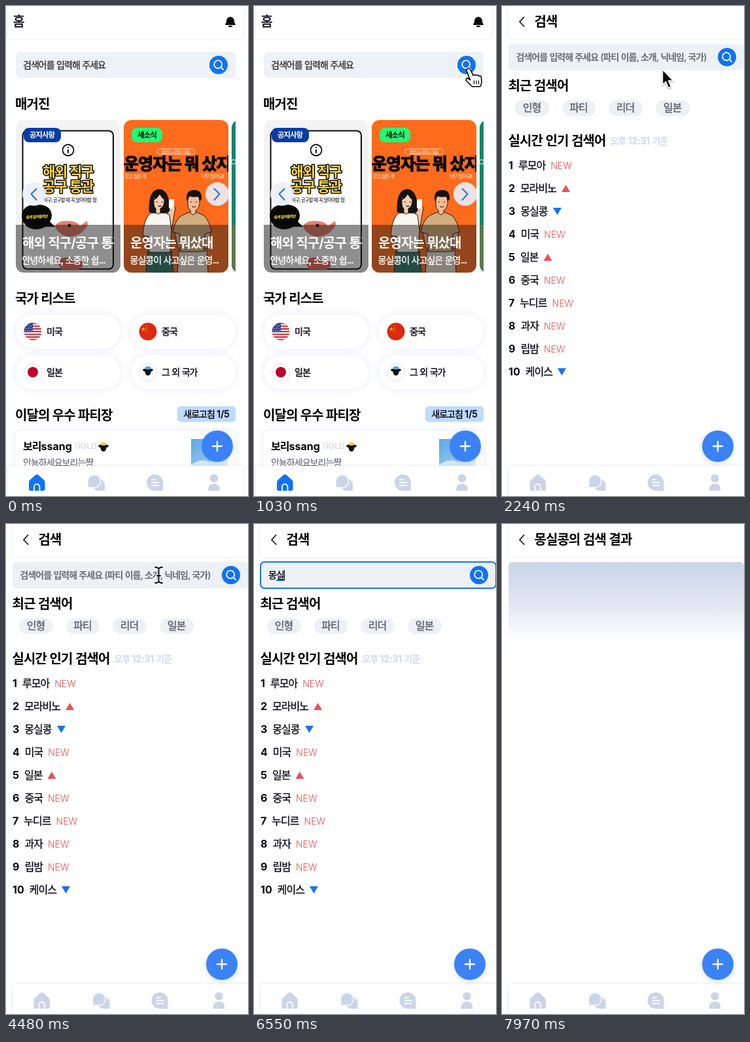
Recreate the animation shown at these times as an HTML page. Size 370x748 px, loop 8 s.

```html
<!DOCTYPE html>
<html lang="ko">
<head>
<meta charset="utf-8">
<title>홈</title>
<style>
  html, body { margin: 0; width: 100%; height: 100%; overflow: hidden; background: #fff; }
  body, svg { font-family: Inter, "Noto Sans CJK KR", "Noto Sans CJK", sans-serif; letter-spacing: -.06em; word-spacing: .04em; }
  #stage { position: relative; width: 370px; height: 748px; overflow: hidden; color: #050510; }
  svg, .page { position: absolute; inset: 0; width: 370px; height: 748px; }

  .h { font-size: 20px; font-weight: 700; }
  .m { font-size: 20px; font-weight: 600; }
  .t { font-size: 14px; }
  .chip { font-size: 16px; text-anchor: middle; }
  .medium, .t, .chip { font-weight: 500; fill: currentColor; stroke: currentColor; stroke-width: .35px; }
  .badge { font-size: 11.5px; font-weight: 700; text-anchor: middle; }
  .latin { letter-spacing: 0; }
  .white { fill: #fff; color: #fff; }
  .bar { fill: #fff; filter: drop-shadow(0 0 2px #9095b544); }
  .soft { fill: #fff; filter: drop-shadow(0 0 6px #b9c4f055); }
  .fab { fill: #3b82f6; filter: drop-shadow(0 2px 5px #6080d044); }
  .line { fill: none; stroke-linecap: round; stroke-linejoin: round; }

  ol { position: absolute; left: 10px; top: 226px; margin: 0; padding: 0; list-style: none; }
  li { display: flex; gap: 8px; height: 35px; font-size: 16px; line-height: 35px; -webkit-text-stroke: .25px; }
  li b, li i { letter-spacing: 0; -webkit-text-stroke: 0; }
  li i { font-style: normal; font-size: 14px; font-weight: 300; color: #ea4d52; }
  li .up, li .down { width: 13px; height: 11px; margin-top: 12px; background: #ea5156; clip-path: polygon(50% 0, 100% 100%, 0 100%); }
  li .down { background: #1673ef; transform: scaleY(-1); }

  #typed { position: absolute; left: 22px; top: 68px; display: flex; align-items: center; height: 20px; font-size: 14px; line-height: 20px; -webkit-text-stroke: .35px; }
  #typed span::before { content: ""; }
  #live { text-decoration: underline 2px #1673ef; text-underline-offset: 2px; }
  #caret { width: 1px; height: 16px; background: #000; }

  /* Everything shares one 8 s clock */
  #home, #search, #result, #focus, #hint, #caret, #ibeam, #hand, #arrow,
  #done::before, #live::before { animation: 8s step-end infinite; }
  #home { animation-name: home; }
  #search { animation-name: search; }
  #result { animation-name: result; }
  #focus { animation-name: focus; }
  #hint { animation-name: hint; }
  #caret { animation-name: caret; }
  #done::before { animation-name: done; }
  #live::before { animation-name: live; }
  #hand { animation-name: hand; }
  #arrow { animation-name: arrow; }
  #ibeam { animation-name: ibeam; }
  #handPath { animation: handPath 8s linear infinite; }
  #arrowPath { animation: arrowPath 8s ease-out infinite; }

  @keyframes home { 0% { opacity: 1 } 28% { opacity: 0 } }
  @keyframes search { 0% { opacity: 0 } 28% { opacity: 1 } 91.625% { opacity: 0 } }
  @keyframes result { 0% { opacity: 0 } 91.625% { opacity: 1 } }
  @keyframes focus { 0% { opacity: 0 } 58.75% { opacity: 1 } }
  @keyframes hint { 0% { opacity: 1 } 68.5% { opacity: 0 } }
  @keyframes caret { 0% { opacity: 0 } 58.75% { opacity: 1 } 65.125% { opacity: 0 } 68.5% { opacity: 1 } }
  @keyframes done { 0% { content: "" } 76.125% { content: "몽" } 82.25% { content: "몽실" } }
  @keyframes live {
    0% { content: "" } 68.5% { content: "ㅁ" } 70.5% { content: "모" } 74.625% { content: "몽" }
    76.125% { content: "ㅅ" } 77.625% { content: "시" } 79.875% { content: "실" }
    82.25% { content: "ㅋ" } 83.375% { content: "코" } 85.25% { content: "콩" }
  }
  @keyframes hand { 0% { opacity: 0 } 12.125% { opacity: 1 } 15.5% { opacity: 0 } }
  @keyframes handPath { 0%, 12.125% { transform: translate(24px, 40px) } 12.8%, 100% { transform: none } }
  @keyframes arrow { 0% { opacity: 0 } 28% { opacity: 1 } 29.5% { opacity: 0 } }
  @keyframes arrowPath { 0%, 28.1% { transform: none } 29.5%, 100% { transform: translate(-8px, -12px) } }
  @keyframes ibeam { 0% { opacity: 0 } 29.5% { opacity: 1 } 68.5% { opacity: 0 } }
</style>
</head>
<body>
<div id="stage">

<svg width="0" height="0">
  <defs>
    <linearGradient id="fade" x2="0" y2="1"><stop stop-color="#cad5e7"/><stop offset=".55" stop-color="#e3e8f4"/><stop offset="1" stop-color="#fff"/></linearGradient>
    <linearGradient id="sky" x2="1" y2="1"><stop stop-color="#5ba8e4"/><stop offset="1" stop-color="#c5e2f6"/></linearGradient>
    <clipPath id="card"><rect width="160" height="233" rx="12"/></clipPath>
    <clipPath id="cardText"><rect x="10" y="160" width="140" height="73"/></clipPath>
    <clipPath id="strip"><rect x="15" y="174" width="336" height="233"/></clipPath>
    <clipPath id="flag"><circle r="13.5"/></clipPath>

    <g id="lens">
      <circle r="14" fill="#0f73f6"/>
      <path class="line" d="M4 4l3 3M5.2-.8a6 6 0 1 1-12 0a6 6 0 1 1 12 0" stroke="#fff" stroke-width="1.8"/>
    </g>
    <g id="sheep">
      <path d="M-8-2q2-2 4-1q4-3 8 0q2-1 4 1q-1 3-3.500 3q-.5 6-4.500 6t-4.500-6q-2.500 0-3.500-3z" fill="#0b0b12"/>
      <ellipse cy="-4.500" rx="4.500" ry="2.500" fill="var(--cap)"/>
    </g>
    <g id="plus">
      <circle class="fab" r="24"/>
      <path class="line" d="M-7 0H7M0-7V7" stroke="#fff" stroke-width="2.4"/>
    </g>
    <g id="nav">
      <rect class="bar" x="3" y="702" width="360" height="60"/>
      <path d="M45.300 715.700q2-1.400 4 0l8.700 7.800q1.600 1.500 1.600 3.500v10q0 3-3 3H38q-3 0-3-3v-10q0-2 1.600-3.500z" fill="var(--home)"/>
      <path class="line" d="M43 741v-7a4.200 4.200 0 0 1 8.400 0v7" stroke="#fff" stroke-width="1.800"/>
      <g fill="#cbd5e8">
        <path d="M142 722a9.500 9.500 0 0 1 9 9v9h-9a9 9 0 0 1-8-5z"/>
        <path d="M125 735v-10a9.800 9.800 0 1 1 10 10z" stroke="#fff" stroke-width="1.500"/>
        <path d="M240 740h-12.500a12.500 12.500 0 1 1 12.500-12.500z"/>
        <circle cx="318" cy="721" r="6.200"/>
        <path d="M309 740q0-11 9-11t9 11z"/>
      </g>
      <path class="line" d="M223 723h5M223 727.500h10M223 732h10" stroke="#fff" stroke-width="2"/>
    </g>
    <g id="back">
      <rect class="bar" x="10" y="-10" width="370" height="60"/>
      <path class="line" d="M33.500 17l-6.500 7 6.500 7" stroke="#111" stroke-width="1.700"/>
    </g>
  </defs>
</svg>

<div class="page" id="home">
<svg style="--home:#0f73f6">
  <rect class="bar" x="3" y="-10" width="360" height="60"/>
  <text class="medium" x="10.500" y="31" font-size="20">홈</text>
  <path d="M335 28q2-2 2-5a6 6.500 0 0 1 12 0q0 3 2 5q0 1-1 1h-14q-1 0-1-1zM339.500 30h7q-1 2.500-3.500 2.500t-3.500-2.500z" fill="#060606"/>

  <rect x="15" y="70" width="336" height="40" rx="8" fill="#edf1f8"/>
  <text class="t" x="26" y="95" color="#333">검색어를 입력해 주세요</text>
  <use href="#lens" x="325" y="90"/>

  <text class="h" x="14" y="157">매거진</text>
  <g clip-path="url(#strip)">
    <g transform="translate(15 174)">
      <g clip-path="url(#card)">
        <rect width="160" height="233" fill="#f3f3f3"/>
        <rect x="10.500" y="16.500" width="138.500" height="211" rx="7" fill="#fff" stroke="#0a0a0a" stroke-width="2"/>
        <circle cx="80" cy="46" r="8.500" fill="none" stroke="#111" stroke-width="1.800"/>
        <path d="M80 45v5.500M80 41v1.800" stroke="#111" stroke-width="2.200"/>
        <g font-size="21" font-weight="900" text-anchor="middle" fill="#ffd447" stroke="#0a0a0a" stroke-width="3" stroke-linejoin="round" paint-order="stroke">
          <text x="80" y="86">해외 직구</text><text x="80" y="109">공구 통관</text>
        </g>
        <text x="42" y="125" font-size="7.500" font-weight="500">직구, 공구할 때 꼭 알아야할 점</text>
        <path d="M9 145q2-16 23-16q22 0 23 17q0 5-3 9l8 8-15 0q-6 4-15 4q-20-2-21-22z" fill="#080808"/>
        <text x="32" y="150" font-size="6" font-weight="700" text-anchor="middle" fill="#ffdc43" transform="rotate(-3 32 148)">쉽게 알려줄게양</text>
        <path d="M60 163q3-9 18-9q16 0 20 8l11-8q3 8-4 13q-5 9-22 11q-15 0-23-15z" fill="#ec806b"/>
        <path d="M62 216q12-10 26-4q8 4 16 0q2 12-8 16h-26z" fill="#e7705d"/>
        <circle cx="82" cy="161" r="2.500"/>
        <rect y="160" width="160" height="73" fill="#101010" opacity=".47"/>
      </g>
      <rect x="12" y="12" width="57" height="22" rx="8" fill="#073ca3"/>
      <text class="badge white" x="40" y="27">공지사항</text>
      <g class="white" clip-path="url(#cardText)">
        <text class="h" x="10" y="195">해외 직구/공구 통관</text>
        <text class="t" x="9.500" y="219">안녕하세요, 소중한 쉽...</text>
      </g>
    </g>

    <g transform="translate(180 174)">
      <g clip-path="url(#card)">
        <rect width="160" height="233" fill="#ff6b1c"/>
        <rect x="51" y="44" width="57" height="8" rx="4" fill="none" stroke="#fff" stroke-width=".8"/>
        <text class="white" x="79.500" y="50.500" font-size="5.500" text-anchor="middle">쉽게보는 운영자 기획템</text>
        <text y="76" font-size="25" font-weight="900" stroke="#050505" stroke-width="1.200">운영자는 뭐 샀지</text>
        <g class="white" font-size="7.500" font-weight="500"><text x="1" y="89">갖고 싶은 게</text><text x="119" y="89">너무 많아요!!</text></g>

        <g stroke="#201713" stroke-width="1" stroke-linejoin="round">
          <path d="M37 200h36l3 34H34z" fill="#26796a"/>
          <path d="M30 176l11 26 9-4-8-26zM62 158l9-27 8 3-6 34z" fill="#f5c5a3"/>
          <path d="M40 143l10-4h9l11 6 3 24-2 33H39l-1-24-9-2q2-25 11-33z" fill="#faf7f1"/>
          <path d="M39 140q-1-34 15-34q16 0 16 33l-6 3H44z" fill="#151313"/>
          <path d="M46 117q8-7 16 0v9q-2 8-6 9v6l-3 3-4-3v-6q-3-2-3-9z" fill="#f8cdb0"/>
          <path d="M84 199h43l2 35H82z" fill="#e8dfd0"/>
          <path d="M77 168l6 28 30-6-1-8-21 3-3-16zM133 168l-4 28-30-2v-8l22-1 2-18z" fill="#f0b992"/>
          <path d="M90 145l10-4h12l11 5q8 8 11 25l-10 3-1 27H86v-27l-11-3q4-20 15-26z" fill="#d3ad7c"/>
          <path d="M98 119q9-10 18 0v10q-3 8-6 9v4l-4 3-4-3v-4q-4-3-4-9z" fill="#f3bd98"/>
        </g>
        <path d="M46 122q6-2 9-9q3 7 8 9q1-13-8-13t-9 13zM96 122q-1-15 11-15q13-1 12 14l-3 3-2-7q-9 2-14-1l-2 8z" fill="#151313"/>
        <path d="M50 125h2M58 125h2M102 125h2M110 125h2M53 131q2 2 4 0M105 132q2 2 5 0" class="line" stroke="#3a211a" stroke-width="1.200"/>
        <rect x="69" y="121" width="8" height="14" rx="2" class="white"/>
        <rect y="160" width="160" height="73" fill="#221d19" opacity=".48"/>
      </g>
      <rect x="12" y="12" width="47" height="22" rx="8" fill="#20fa78"/>
      <text class="badge" x="35.500" y="27">새소식</text>
      <g class="white">
        <text class="h" x="10" y="195">운영자는 뭐샀대</text>
        <text class="t" x="9.500" y="219">몽실콩이 사고싶은 운영...</text>
      </g>
    </g>

    <g transform="translate(345 174)" clip-path="url(#card)">
      <rect width="160" height="233" fill="#16836d"/>
      <circle cx="3" cy="64" r="3.500" fill="none" stroke="#fff"/>
      <rect y="160" width="160" height="73" fill="#6f7840" opacity=".75"/>
    </g>
  </g>
  <g fill="#ebeff8" fill-opacity=".9"><circle cx="43" cy="287" r="18"/><circle cx="323" cy="287" r="18"/></g>
  <path class="line" d="M46.500 279l-8 8 8 9M318.500 279l8 8-8 9" stroke="#2870e8" stroke-width="2"/>

  <text class="h" x="14" y="454">국가 리스트</text>
  <g class="soft">
    <rect x="15" y="471" width="160" height="52" rx="26"/><rect x="191" y="471" width="160" height="52" rx="26"/>
    <rect x="15" y="533" width="160" height="52" rx="26"/><rect x="191" y="533" width="160" height="52" rx="26"/>
  </g>
  <g transform="translate(41 497)" clip-path="url(#flag)">
    <rect x="-14" y="-14" width="28" height="28" fill="#f6f2f2"/>
    <path d="M0-13.500v27" stroke="#c6303d" stroke-width="28" stroke-dasharray="2.080"/>
    <rect x="-14" y="-14" width="14" height="14.500" fill="#33458d"/>
    <path d="M-10-9h9M-11-5h10M-12-1h11" stroke="#fff" stroke-width="1.200" stroke-dasharray="1.200 2"/>
  </g>
  <circle cx="217" cy="497" r="13.500" fill="#df2810"/>
  <path d="M210 490.500l.8 2h2l-1.600 1.300.7 2-1.900-1.200-1.900 1.200.7-2-1.600-1.300h2z" fill="#ffdc20"/>
  <path d="M214.500 488v10" stroke="#ffdc20" stroke-width="1.200" stroke-dasharray="1.200 1.800"/>
  <g fill="#fff" stroke="#dfe1e7"><circle cx="41" cy="559" r="13.500"/><circle cx="217" cy="559" r="13.500"/></g>
  <circle cx="41" cy="559" r="8" fill="#bd0630"/>
  <use href="#sheep" x="217" y="557" style="--cap:#4aa3ed"/>
  <text class="t" x="62" y="501.500">미국</text><text class="t" x="238" y="501.500">중국</text>
  <text class="t" x="62" y="563.500">일본</text><text class="t" x="238" y="563.500">그 외 국가</text>

  <text class="h" x="14" y="632">이달의 우수 파티장</text>
  <rect x="262" y="611" width="89" height="24" rx="5" fill="#bfdbfe"/>
  <text class="t" x="306.500" y="628" text-anchor="middle">새로고침 <tspan class="latin">1/5</tspan></text>
  <rect class="soft" x="15" y="649" width="336" height="110" rx="4"/>
  <text x="26" y="678" font-size="16" font-weight="700">보리<tspan class="latin">ssang</tspan></text>
  <text class="latin" x="105" y="676" font-size="12" fill="#c8d1df">GOLD</text>
  <use href="#sheep" x="149" y="673" style="--cap:#f6c844"/>
  <text x="26" y="702" font-size="14" fill="#555b66">안뇽하세요보리는쨩</text>
  <rect x="283" y="661" width="56" height="56" fill="url(#sky)"/>
  <path d="M283 700q16-10 28-4q10-12 28-10v20h-56z" fill="#e9f4fc" opacity=".8"/>
  <use href="#nav"/>
  <use href="#plus" x="323" y="672"/>
</svg>
</div>

<div class="page" id="search">
<svg style="--home:#cbd5e8">
  <use href="#back"/>
  <text class="m" x="49.500" y="31">검색</text>
  <rect x="10" y="58" width="360" height="40" rx="6" fill="#edf1f6"/>
  <rect id="focus" x="10" y="58" width="360" height="40" rx="6" fill="none" stroke="#1673ef" stroke-width="2"/>
  <text id="hint" x="21.500" y="83" font-size="14" font-weight="600" fill="#686e7a">검색어를 입력해 주세요 (파티 이름, 소개, 닉네임, 국가)</text>
  <use href="#lens" x="344" y="78"/>
  <text class="m" x="9.500" y="129">최근 검색어</text>
  <g fill="#edf1f6">
    <rect x="20" y="144" width="52" height="24" rx="12"/><rect x="92" y="144" width="51" height="24" rx="12"/>
    <rect x="163" y="144" width="52" height="24" rx="12"/><rect x="235" y="144" width="52" height="24" rx="12"/>
  </g>
  <g class="chip" color="#5b626f"><text x="45.500" y="161">인형</text><text x="117" y="161">파티</text><text x="188.500" y="161">리더</text><text x="260.500" y="161">일본</text></g>
  <text class="m" x="9.500" y="213">실시간 인기 검색어</text>
  <text class="t" x="165.500" y="211" color="#cbd5e8">오후 <tspan class="latin">12:31</tspan> 기준</text>
  <use href="#nav" x="7.500"/>
  <use href="#plus" x="330" y="672"/>
</svg>
<ol>
  <li><b>1</b>루모아<i>NEW</i></li>
  <li><b>2</b>모라비노<span class="up"></span></li>
  <li><b>3</b>몽실콩<span class="down"></span></li>
  <li><b>4</b>미국<i>NEW</i></li>
  <li><b>5</b>일본<span class="up"></span></li>
  <li><b>6</b>중국<i>NEW</i></li>
  <li><b>7</b>누디르<i>NEW</i></li>
  <li><b>8</b>과자<i>NEW</i></li>
  <li><b>9</b>립밤<i>NEW</i></li>
  <li><b>10</b>케이스<span class="down"></span></li>
</ol>
<div id="typed"><span id="done"></span><span id="live"></span><div id="caret"></div></div>
</div>

<div class="page" id="result">
<svg style="--home:#cbd5e8">
  <use href="#back"/>
  <text class="m" x="49.500" y="31">몽실콩의 검색 결과</text>
  <rect x="10" y="58" width="360" height="123" rx="6" fill="url(#fade)"/>
  <use href="#nav" x="7.500"/>
  <use href="#plus" x="330" y="672"/>
</svg>
</div>

<svg>
  <g id="hand"><g id="handPath">
    <path d="M326 96q3-2 5 1l4 9q2-2 4.500 0q2-2 4.500 1q3-1 3.500 2l.5 6q0 4-2 8h-12.500l-9-9q-1-4 2-4l4 3-5.500-14q0-2 1-3z" fill="#fff" stroke="#000" stroke-width="1.600" stroke-linejoin="round"/>
    <path class="line" d="M336.500 114v5M340 114v5M343.500 114v5" stroke="#000" stroke-width="1.200"/>
  </g></g>
  <g id="arrow"><g id="arrowPath">
    <path d="M245.500 97v23l5-4.500 4 9.500 4-1.700-4-9.300h7z" stroke="#fff" stroke-width="1.500" style="filter:drop-shadow(0 1px 1px #0006)"/>
  </g></g>
  <g id="ibeam" class="line">
    <path d="M228 66q5 0 5.500 3q.5-3 5.500-3M233.500 69v18M228 90q5 0 5.500-3q.5 3 5.500 3M231 79h5" stroke="#fff" stroke-width="4"/>
    <path d="M228 66q5 0 5.500 3q.5-3 5.500-3M233.500 69v18M228 90q5 0 5.500-3q.5 3 5.500 3M231 79h5" stroke="#000" stroke-width="1.800"/>
  </g>
</svg>

</div>
</body>
</html>
```
